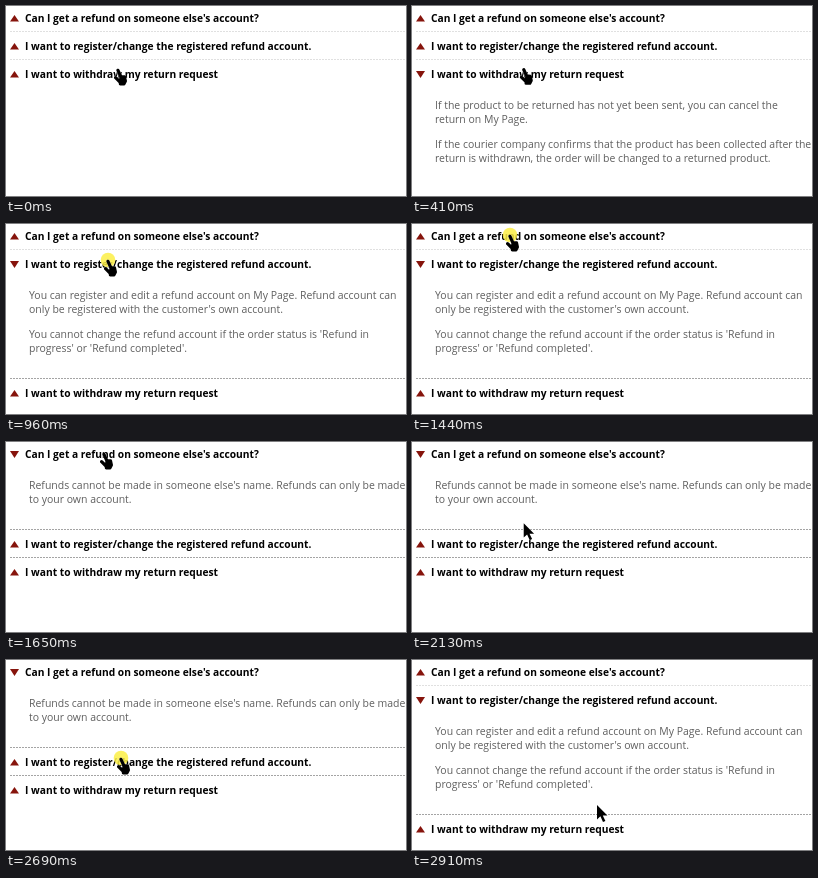
Write an HTML page that moves like this. It is 400 px wide and 190 px high and loops after 2.98 s.

```html
<!DOCTYPE html>
<html lang="en">
<head>
<meta charset="utf-8">
<title>Refund questions</title>
<style>
  html, body { margin: 0; width: 100%; height: 100%; overflow: hidden; background: #fff; }
  svg { display: block; width: 400px; height: 190px; font-family: "Open Sans", "Noto Sans", sans-serif; }
  .title { font-size: 10.22px; font-weight: 700; fill: #000; }
  .body { font-size: 10.48px; fill: #5e5e5e; }
  .mark { fill: #86140c; }
  .rule { stroke: #e0e0e0; stroke-dasharray: 2 1; }
  .rule.dark { stroke: #a4a4a4; }
  #cursor { filter: drop-shadow(0 0 .5px #fff); }
  #hand { stroke: #000; stroke-width: 3.2; stroke-linecap: round; stroke-linejoin: round; }
</style>
</head>
<body>
<svg id="stage" viewBox="0 0 400 190">
  <g id="list"></g>
  <circle id="click" r="7.3" fill="#fbee45" opacity=".85"/>
  <g id="cursor">
    <path id="hand" d="M0 1.3L3 8M-2.4 8.7L2 13M3 7.5L6.5 7.8L7.4 12L6 14.8H2.3Z"/>
    <path id="arrow" d="M0 0V14.4L3.4 11.3L6 17L8.4 15.9L5.8 10.5H10.4Z"/>
  </g>
</svg>
<script>
const LOOP = 2980;
const ROW = 28;          // height of a closed item
const PARAGRAPH = 39;    // height of a two-line paragraph with its gap
const LINE = 14;

const items = [
  { title: "Can I get a refund on someone else's account?", paragraphs: [
    ["Refunds cannot be made in someone else's name. Refunds can only be made",
     "to your own account."]] },
  { title: "I want to register/change the registered refund account.", paragraphs: [
    ["You can register and edit a refund account on My Page. Refund account can",
     "only be registered with the customer's own account."],
    ["You cannot change the refund account if the order status is 'Refund in",
     "progress' or 'Refund completed'."]] },
  { title: "I want to withdraw my return request", paragraphs: [
    ["If the product to be returned has not yet been sent, you can cancel the",
     "return on My Page."],
    ["If the courier company confirms that the product has been collected after the",
     "return is withdrawn, the order will be changed to a returned product."]] }
];

// Pointer stops: each rests from arrive to leave and toggles its item at open
const stops = [
  { item: 2, x: 112, y: 63, arrive: 0, open: 220, leave: 380 },
  { item: 1, x: 102, y: 36, arrive: 740, open: 830, leave: 1000 },
  { item: 0, x: 98, y: 11, arrive: 1240, open: 1450, leave: 1700 },
  { item: 1, x: 115, y: 98, arrive: 2300, open: 2760, leave: 2800 },
  { x: 185, y: 145, arrive: 2910, open: Infinity, leave: LOOP }
];
const CLICK_SPAN = 145;

const $ = id => document.getElementById(id);
const show = (el, on) => el.setAttribute("display", on ? "inline" : "none");
const move = (el, x, y) => el.setAttribute("transform", `translate(${x} ${y})`);
const mix = (a, b, k) => a + (b - a) * k;
const smooth = k => k * k * (3 - 2 * k);

function add(parent, tag, attrs, text = "") {
  const el = document.createElementNS(parent.namespaceURI, tag);
  for (const key in attrs) el.setAttribute(key, attrs[key]);
  el.textContent = text;
  return parent.appendChild(el);
}

for (const item of items) {
  item.height = 51 + PARAGRAPH * item.paragraphs.length;
  item.group = add($("list"), "g", {});
  item.mark = add(item.group, "path", { class: "mark" });
  add(item.group, "text", { class: "title", x: 19, y: 4 }, item.title);
  item.body = add(item.group, "g", { class: "body" });
  item.paragraphs.forEach((lines, p) => lines.forEach((line, i) =>
    add(item.body, "text", { x: 23, y: 35 + p * PARAGRAPH + i * LINE }, line)));
}
const rules = items.slice(1).map(() => add($("list"), "line", { class: "rule", x1: 4, x2: 399 }));

function pointerAt(t) {
  const i = stops.findLastIndex(s => s.arrive <= t);
  const from = stops[i], to = stops[i + 1] ?? from;
  const k = t < from.leave ? 0 : smooth((t - from.leave) / (to.arrive - from.leave));
  return { x: mix(from.x, to.x, k), y: mix(from.y, to.y, k) };
}

function render(t) {
  const open = stops.findLast(s => s.open <= t)?.item ?? -1;
  const { x, y } = pointerAt(t);
  let rowY = 12, overTitle = false;
  items.forEach((item, i) => {
    const isOpen = i === open;
    move(item.group, 0, rowY);
    item.mark.setAttribute("d", isOpen ? "M4-3H13L8.5 4Z" : "M4 3.5H13L8.5-3Z");
    show(item.body, isOpen);
    overTitle ||= Math.abs(y - rowY) < ROW / 2;
    rowY += isOpen ? item.height : ROW;
    const rule = rules[i];
    if (rule) {
      move(rule, 0, rowY - 14.5);
      rule.classList.toggle("dark", open >= 0 && i >= open);
    }
  });
  move($("cursor"), x, y);
  move($("click"), x, y);
  show($("hand"), overTitle);
  show($("arrow"), !overTitle);
  show($("click"), stops.some(s => Math.abs(t - s.open) < CLICK_SPAN && t < s.leave));
}

const start = performance.now();
function tick() {
  render((performance.now() - start) % LOOP);
  requestAnimationFrame(tick);
}
tick();
</script>
</body>
</html>
```
